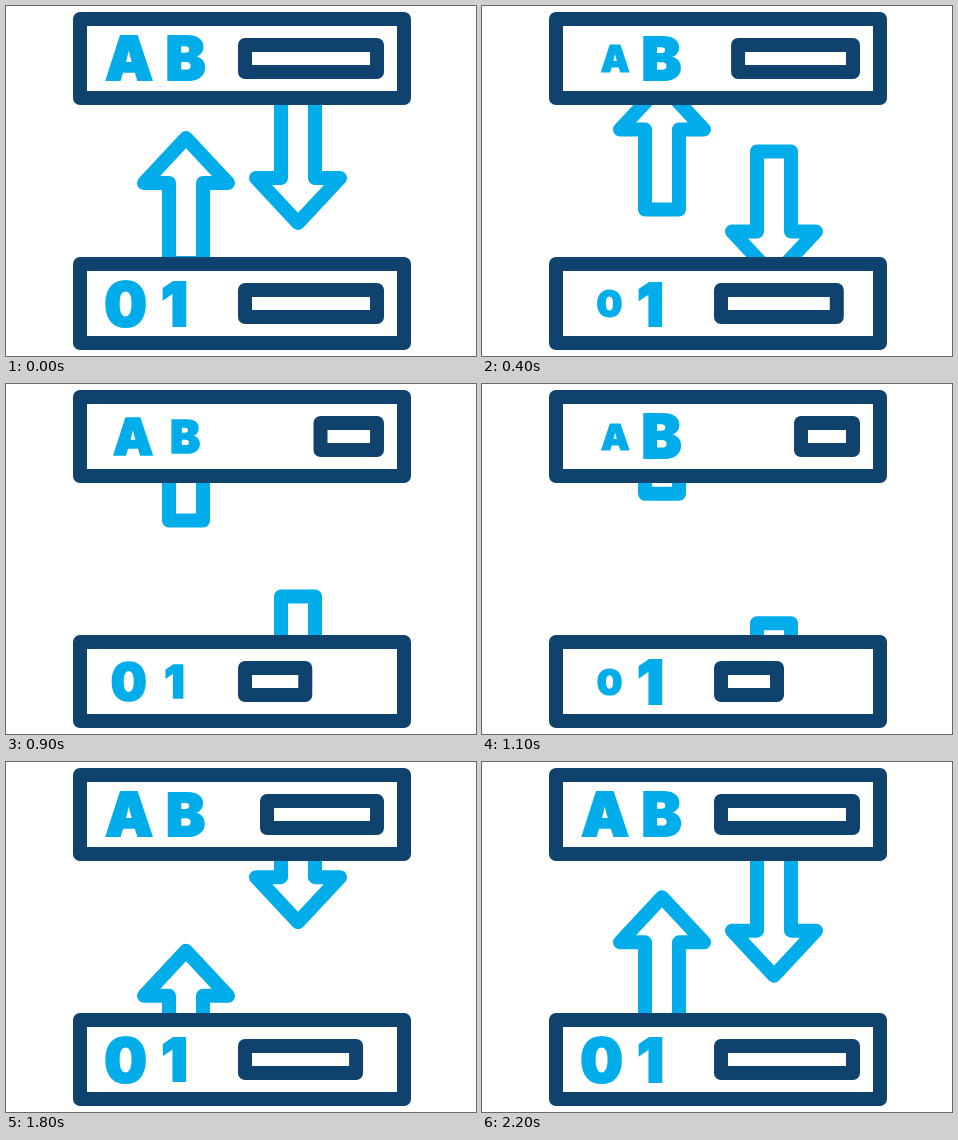
An HTML page that plays this animation: 470x350 px, repeating every 2300 ms.

```html
<!DOCTYPE html>
<html lang="en">
<head>
<meta charset="utf-8">
<title>Data exchange</title>
<style>
  html, body { margin: 0; width: 100%; height: 100%; overflow: hidden; background: #fff; }
  svg { display: block; width: 100vw; height: 100vh; }
  .box, .bar { fill: #fff; stroke: #0f426c; stroke-width: 14; stroke-linejoin: round; }
  .arrow { fill: #fff; stroke: #00adea; stroke-width: 14; stroke-linejoin: round; }
  text { font: 900 60px Inter, "Open Sans", sans-serif; text-anchor: middle;
         fill: #00adea; stroke: #00adea; stroke-width: 2; }
</style>
</head>
<body>
<svg viewBox="0 0 470 350">
  <clipPath id="gap"><rect x="60" y="92" width="350" height="166"/></clipPath>
  <g clip-path="url(#gap)">
    <path id="up" class="arrow" d="M0 0L42 45H17V125H-17V45H-42Z"/>
    <path id="down" class="arrow" d="M0 0L42 -45H17V-125H-17V-45H-42Z"/>
  </g>
  <rect class="box" x="74" y="13" width="324" height="79"/>
  <rect class="box" x="74" y="258" width="324" height="79"/>
  <rect id="topBar" class="bar" y="39" height="27"/>
  <rect id="lowBar" class="bar" x="239" y="284" height="27"/>
  <text id="A" x="123" y="74.4">A</text>
  <text id="B" x="179.5" y="74.4">B</text>
  <text id="zero" x="119.5" y="319.8">0</text>
  <text id="one" x="168.5" y="319.8">1</text>
</svg>
<script>
const LOOP = 2300, STEP = 100, CYCLE = 2225, PULSE = CYCLE / 3;
const SPEED = 0.1338; // arrow travel, px per ms
const $ = id => document.getElementById(id);
const set = (id, attrs) => {
  for (const k in attrs) $(id).setAttribute(k, attrs[k]);
};
const ramp = (t, a, b) => Math.min(1, Math.max(0, (t - a) / (b - a)));
const smooth = x => x * x * (3 - 2 * x);
const smoother = x => x * x * x * (x * (6 * x - 15) + 10);

// Two shrink-and-grow pulses in a row, from the given start
function pulse(t, start) {
  const p = (t - start) / PULSE;
  if (p < 0 || p >= 2) return 1;
  return 1 - 0.4 * smooth(1 - Math.abs(1 - 2 * (p % 1)));
}

function scaleAt(id, s, x, y) {
  set(id, { transform: `translate(${x} ${y}) scale(${s}) translate(${-x} ${-y})` });
}

function draw(t) {
  const tip = 132 - SPEED * (t > 1250 ? t - CYCLE : t);
  set("up", { transform: `translate(180 ${tip})` });
  set("down", { transform: `translate(292 ${349 - tip})` });

  const shrink = smoother(ramp(t, 40, 1112)) - smoother(ramp(t, 1150, 2190));
  set("topBar", { x: 239 + 80 * shrink, width: 132 - 80 * shrink });
  set("lowBar", { width: 132 - 76 * shrink });

  const first = pulse(t, 0), second = pulse(t, PULSE / 2);
  scaleAt("A", first, 149, 52.5);
  scaleAt("zero", first, 140, 298);
  scaleAt("B", second, 178.5, 52.5);
  scaleAt("one", second, 168.5, 298);
}

const begin = performance.now();
function tick() {
  const t = (performance.now() - begin) % LOOP;
  draw(Math.floor(t / STEP) * STEP);
  requestAnimationFrame(tick);
}
tick();
</script>
</body>
</html>
```
